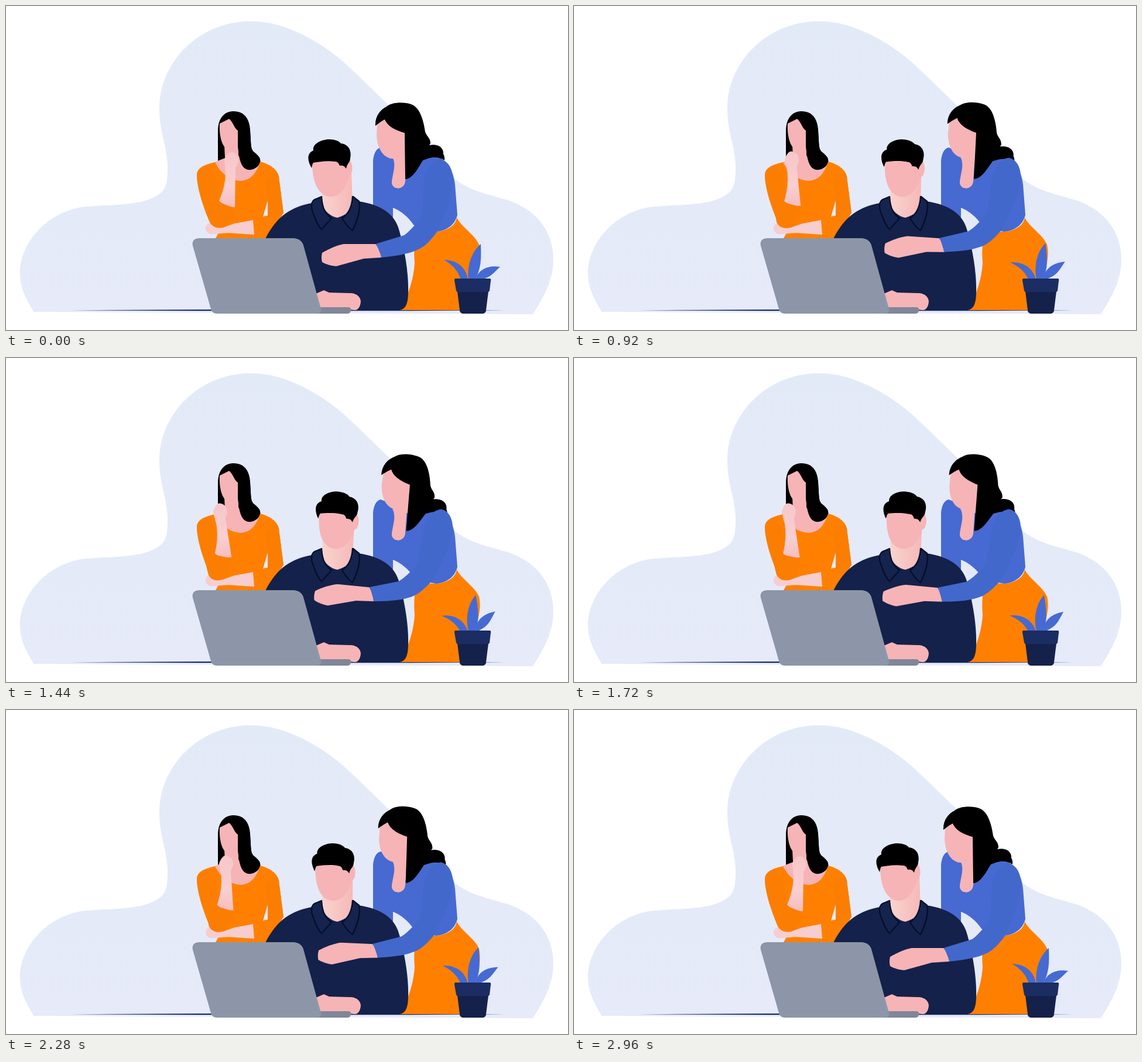
Recreate the animation shown at these times as an HTML page. Size 960 px wide and 554 px high, loop 3000 ms.

```html
<!DOCTYPE html>
<html lang="en">
<head>
<meta charset="utf-8">
<title>Team at a laptop</title>
<style>
  html, body { margin: 0; width: 100%; height: 100%; overflow: hidden; background: #fff; }
  svg { display: block; width: 100vw; height: 100vh; }
  .skin { fill: #f6b4b6; }
  .pale { fill: #f7cdd0; }
  .orange { fill: #ff8000; }
  .sleeve { fill: #fb7e03; }
  .blue { fill: #466ad1; }
  .navy { fill: #14214a; }
  .rim { fill: #1b2d63; }
  .collar { fill: #15244f; stroke: #060e2b; stroke-width: 2.4; stroke-linejoin: round; }
</style>
</head>
<body>
<svg viewBox="0 0 960 554" preserveAspectRatio="none">
  <defs>
    <linearGradient id="sky" x2="0" y2="1">
      <stop stop-color="#e3eaf7"/><stop offset="1" stop-color="#e6eaf9"/>
    </linearGradient>
    <linearGradient id="throat">
      <stop stop-color="#f9d3cd"/><stop offset="1" stop-color="#f6b8b9"/>
    </linearGradient>
    <linearGradient id="forearmTone" x2="0" y2="1">
      <stop stop-color="#f7c6c8"/><stop offset=".6" stop-color="#f8cfd2"/><stop offset="1" stop-color="#f6bcbe"/>
    </linearGradient>
  </defs>

  <path fill="url(#sky)" d="M47 523C35 500 24 485 24 457C24 405 70 350 137 343C190 339 230 341 258 324C275 314 276 300 276 272C274 235 262 215 262 176C262 95 330 26 419 26C480 26 545 65 590 108L648 164C690 205 720 250 757 287C782 313 815 320 850 330C905 345 935 385 935 433C935 468 920 495 900 527Z"/>
  <path fill="#1b2b68" d="M110 520.3L330 519H690L852 520.3L690 521.3H330Z"/>

  <!-- thinking woman -->
  <path d="M362 266V215C362 190 374 180 389 180C408 180 416 194 417 212C419 235 417 245 424 250C431 256 435 260 434 268L415 281L390 268Z"/>
  <path class="skin" d="M373 238L397 235V255L404 268H434C430 288 418 300 401 300C383 299 368 288 356 267L374 260Z"/>
  <path class="skin" d="M365 201L381 193C388 198 389 208 396 213V240C391 246 384 248 379 246C368 240 364 220 365 201Z"/>
  <path d="M396 212C400 208 410 205 416 205C419 235 417 245 424 250C431 256 436 260 434 268C430 277 421 281 413 280C400 277 398 258 396 240Z"/>
  <path class="orange" fill-rule="evenodd" d="M357 267C335 272 326 278 326 290C327 315 338 345 347 367C351 377 362 380 368 379L357 399H445L474 354L466 292C464 279 450 270 434 266C428 286 418 298 401 299C383 298 368 288 357 267ZM447 333L439 360L448 358Z"/>
  <path class="sleeve" d="M343 274C358 285 362 308 364 335L384 345L370 379C362 380 351 377 347 367C338 345 327 315 326 290C327 280 332 277 343 274Z"/>
  <path class="sleeve" d="M443 305C444 292 452 288 464 286L466 292L474 354L447 364L447 333Z"/>
  <path class="pale" d="M341 380C341 373 348 369 356 372L370 379L390 372L422 366L424 391L380 388L352 390C345 390 341 386 341 380Z"/>
  <g id="thinkingArm">
    <path fill="url(#forearmTone)" d="M363 335C370 320 375 302 375 284L373 263C376 255 382 248 387 250C394 252 398 258 397 267L392 277L391 346Z"/>
    <path class="sleeve" d="M363 332C370 340 380 344 391 344C390 360 382 377 370 379C360 381 350 377 347 367L345 340Z"/>
  </g>

  <!-- leaning woman, body -->
  <path class="orange" d="M705 384L735 386C755 384 768 375 770 362C780 380 800 390 808 408C812 425 808 440 803 460L790 520H673C685 500 696 470 698 440C697 425 697 420 698 405Z"/>
  <path class="blue" d="M627 345V265C628 250 634 243 640 242L700 264L735 257C752 262 764 280 767 305L771 357C768 372 755 384 735 386L705 380L696 374C688 362 675 350 661 345V362Z"/>
  <path class="skin" d="M660 258C668 272 659 290 659 303C661 315 680 315 682 300L685 255Z"/>
  <g id="leaningHead">
    <path class="skin" d="M634 203L647 188C655 205 670 215 683 216V266L665 261C648 263 634 248 633 220Z"/>
    <path d="M631 205C630 188 640 177 650 172C660 164 680 164 692 168C708 173 714 200 716 215C719 224 725 225 725 235L723 238C735 235 748 240 747 253C750 258 749 262 749 264C740 258 730 256 712 264C705 275 695 296 682 296L681 217C668 213 652 207 647 194C642 196 635 202 631 205Z"/>
  </g>

  <!-- seated man -->
  <path class="navy" d="M443 398C460 365 480 345 522 337L603 334C640 340 665 355 672 385C682 420 688 460 687 490C687 508 683 520 670 520H530Z"/>
  <path id="neck" fill="url(#throat)"/>
  <path class="collar" d="M527 331C520 336 521 345 525 355C530 370 535 378 539 382L556 363C545 355 540 345 539 326Z"/>
  <path class="collar" d="M593 326L603 334C606 345 602 362 592 384C585 380 580 372 574 363C583 357 591 345 592 326Z"/>
  <g id="manHead">
    <ellipse class="skin" cx="586" cy="277" rx="5.5" ry="13"/>
    <path class="skin" d="M523 268C523 300 533 326 555 326C574 326 585 303 587 282L585 255H525Z"/>
    <path d="M522 277C515 265 513 252 525 247C523 235 540 228 552 228C562 228 569 231 572 235C584 236 591 246 588 260C588 268 583 268 581 278C579 276 578 272 570 273C568 268 566 266 562 266C550 264 535 266 525 268C523 270 523 274 522 277Z"/>
  </g>

  <g id="pointingArm">
    <path class="skin" d="M633 407L642 430L611 432L564 445C554 444 545 441 540 438Q538 430 540 422C550 416 565 409 577 407Z"/>
    <path fill="#4368cc" d="M631 407L680 392C690 385 699 374 708 362C715 340 710 310 717 287C722 273 730 264 741 262C756 264 764 280 764 300C762 325 748 365 735 388C722 405 712 414 700 418C685 425 660 428 641 430Q638 415 631 407Z"/>
  </g>

  <path class="skin" d="M529 492L543 486L552 490L590 491C600 492 606 498 606 506C605 514 602 519 597 520L537 516Z"/>
  <path fill="#7f8798" d="M532 515H586Q590 516 589 521Q588 526 583 526H530Z"/>
  <path fill="#8d96a9" d="M330 397H490C500 397 506 402 508 409L538 518C539 523 536 526 532 526H360C354 526 351 522 350 518L319 410C317 402 322 397 330 397Z"/>

  <g class="blue">
    <path id="leftLeaf" d="M748 434C768 434 786 445 789 468H777C772 452 762 442 748 434Z"/>
    <path id="midLeaf" d="M811 407C812 430 812 450 801 468H790C787 445 795 420 811 407Z"/>
    <path id="rightLeaf" d="M844 446C824 443 806 450 801 470L814 467C828 464 834 455 844 446Z"/>
  </g>
  <path class="navy" d="M771 488H824L820 520C820 524 817 526 813 526H782C778 526 775 524 775 520Z"/>
  <path class="rim" d="M767 466H827Q829 467 828 470L826 487Q825 489 823 489H772Q770 489 769 487L766 469Q766 466 767 466Z"/>
</svg>
<script>
  const PERIOD = 3000, STEP = 40;
  const byId = id => document.getElementById(id);

  // Each joint swings from rest to `angle` degrees about its pivot and back.
  const joints = [
    { id: 'thinkingArm', angle: -9.8, pivot: [368, 376] },
    { id: 'leaningHead', angle: 5.4, pivot: [688, 312] },
    { id: 'manHead', angle: 5.2, pivot: [555, 400] },
    { id: 'pointingArm', angle: 5.6, pivot: [779, 288] },
    { id: 'leftLeaf', angle: -8, pivot: [795, 466] },
    { id: 'midLeaf', angle: -8.2, pivot: [795, 466] },
    { id: 'rightLeaf', angle: -18, pivot: [800, 466] }
  ].map(joint => ({ ...joint, node: byId(joint.id) }));
  const neck = byId('neck');

  function draw(time) {
    const swing = (1 - Math.cos(2 * Math.PI * time / PERIOD)) / 2;
    for (const { node, angle, pivot } of joints)
      node.setAttribute('transform', `rotate(${angle * swing} ${pivot})`);
    neck.setAttribute('d', `M${540 + swing} 298L540 340C545 352 555 360 566 362C580 358 590 350 592 340L${590 + 5 * swing} 284Z`);
  }

  const start = performance.now();
  function tick() {
    const time = (performance.now() - start) % PERIOD;
    draw(Math.floor(time / STEP) * STEP);
    requestAnimationFrame(tick);
  }
  tick();
</script>
</body>
</html>
```
